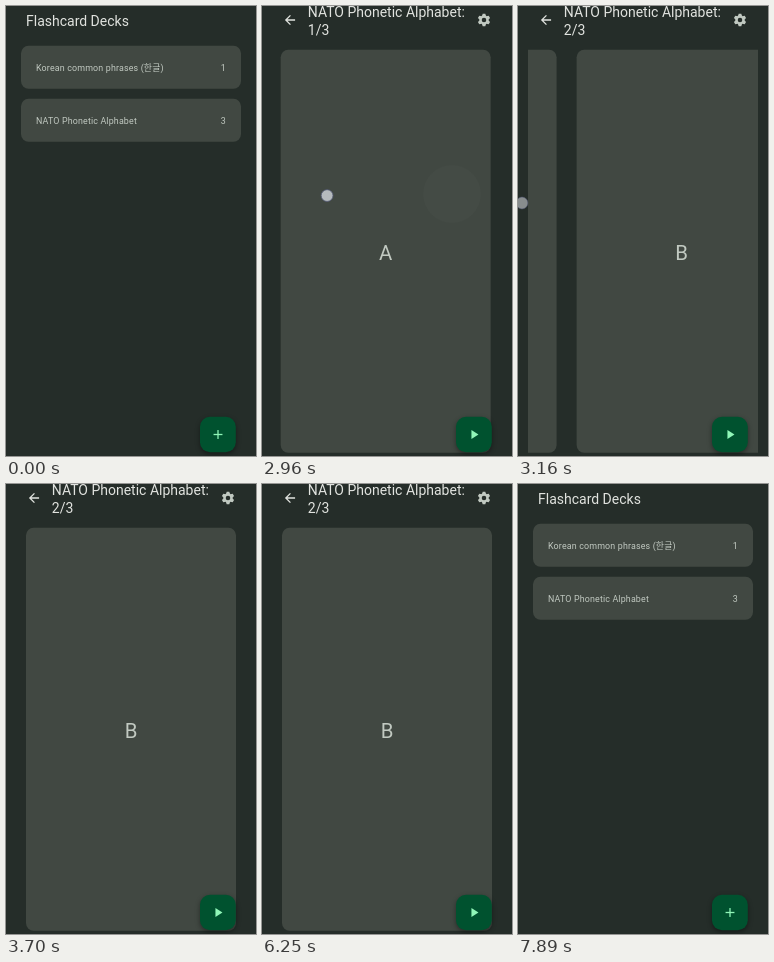
Animation, 250 px wide and 450 px high, one loop 9.7 s. Source, as an HTML page with a canvas:

```html
<!DOCTYPE html>
<html lang="en">
<head>
<meta charset="utf-8">
<title>Flashcards</title>
<style>
  html, body { margin: 0; width: 100%; height: 100%; overflow: hidden; background: #252d29; }
  canvas { display: block; width: 250px; height: 450px; }
</style>
</head>
<body>
<canvas id="stage"></canvas>
<script>
const W = 250, H = 450, LOOP = 9700;
const BG = '#252d29', CARD = '#414842', TITLE = '#e1e3df', BODY = '#c1c9c1';
const FAB = '#00522f', FAB_ICON = '#90f6b8';
const FONT = 'Roboto, "Noto Sans CJK KR", "Noto Sans CJK", sans-serif';
const PAGE = 230;

const scale = window.devicePixelRatio || 1;
const stage = document.getElementById('stage');
const layer = document.createElement('canvas');
for (const canvas of [stage, layer]) {
  canvas.width = W * scale;
  canvas.height = H * scale;
}
const out = stage.getContext('2d');
const ctx = layer.getContext('2d');
out.scale(scale, scale);
ctx.scale(scale, scale);

const clamp = v => Math.max(0, Math.min(1, v));
const progress = (t, start, length) => clamp((t - start) / length);

// Material "fast out, slow in": cubic-bezier(.4, 0, .2, 1)
function fastOutSlowIn(x) {
  let lo = 0, hi = 1;
  for (let i = 0; i < 24; i++) {
    const s = (lo + hi) / 2, r = 1 - s;
    if (1.2 * r * r * s + 0.6 * r * s * s + s * s * s < x) lo = s; else hi = s;
  }
  return lo * lo * (3 - 2 * lo);
}

const fade = (t, start, length) => fastOutSlowIn(progress(t, start, length));

function interpolate(points, t) {
  const i = points.findIndex(p => p[0] > t);
  if (i < 0) return points[points.length - 1].slice(1);
  if (i === 0) return points[0].slice(1);
  const a = points[i - 1], b = points[i];
  const k = (t - a[0]) / (b[0] - a[0]);
  return [a[1] + (b[1] - a[1]) * k, a[2] + (b[2] - a[2]) * k];
}

function text(str, x, y, size, color, align = 'left', spacing = 0) {
  ctx.font = `${size}px ${FONT}`;
  ctx.letterSpacing = `${spacing}px`;
  ctx.textAlign = align;
  ctx.fillStyle = color;
  ctx.fillText(str, x, y);
}

function box(x, y, w, h, r, color) {
  ctx.fillStyle = color;
  ctx.beginPath();
  ctx.roundRect(x, y, w, h, r);
  ctx.fill();
}

function polygon(color, ...points) {
  ctx.fillStyle = color;
  ctx.beginPath();
  for (const [x, y] of points) ctx.lineTo(x, y);
  ctx.fill();
}

// Runs draw() in the 24-unit icon grid, centred on (x, y)
function icon(x, y, draw) {
  ctx.save();
  ctx.translate(x, y);
  ctx.scale(0.636, 0.636);
  draw();
  ctx.restore();
}

function plus() {
  ctx.fillStyle = FAB_ICON;
  ctx.fillRect(-7, -1, 14, 2);
  ctx.fillRect(-1, -7, 2, 14);
}

function play() {
  polygon(FAB_ICON, [-4, -7], [7, 0], [-4, 7]);
}

function backArrow() {
  ctx.strokeStyle = TITLE;
  ctx.lineWidth = 2;
  ctx.beginPath();
  ctx.moveTo(8, 0);
  ctx.lineTo(-6.5, 0);
  ctx.moveTo(0.7, -7.3);
  ctx.lineTo(-6.6, 0);
  ctx.lineTo(0.7, 7.3);
  ctx.stroke();
}

function gear() {
  for (let i = 0; i < 6; i++) {
    polygon(BODY, [-3.2, -6], [-2.1, -9.8], [2.1, -9.8], [3.2, -6]);
    ctx.rotate(Math.PI / 3);
  }
  ctx.strokeStyle = BODY;
  ctx.lineWidth = 3.8;
  ctx.beginPath();
  ctx.arc(0, 0, 5.5, 0, 7);
  ctx.stroke();
}

function fab(symbol) {
  ctx.save();
  ctx.shadowColor = 'rgba(0,0,0,.4)';
  ctx.shadowBlur = 5 * scale;
  ctx.shadowOffsetY = 2 * scale;
  box(194, 410.7, 35.8, 35.6, 10, FAB);
  ctx.restore();
  icon(212, 428.5, symbol);
}

function clear() {
  ctx.fillStyle = BG;
  ctx.fillRect(0, 0, W, H);
}

function deckList() {
  clear();
  text('Flashcard Decks', 20, 19.6, 14, TITLE);
  const decks = [['Korean common phrases (한글)', 1], ['NATO Phonetic Alphabet', 3]];
  decks.forEach(([name, count], i) => {
    const y = 39.7 + i * 53;
    box(15, y, 220, 43, 7.6, CARD);
    text(name, 30, y + 25, 8.9, BODY, 'left', 0.16);
    text(count, 220, y + 25, 8.9, BODY, 'right', 0.16);
  });
  fab(plus);
}

function face(str, x, alpha) {
  ctx.globalAlpha = alpha;
  text(str, x, 253.5, 20.36, BODY, 'center');
  ctx.globalAlpha = 1;
}

function study(t) {
  const slide = 1 - Math.pow(1 - progress(t, 2960, 330), 1.9);
  const flipped = fade(t, 4190, 300) - fade(t, 5590, 300);

  clear();
  text('NATO Phonetic Alphabet:', 45.8, 10.7, 14, TITLE);
  text(slide > 0.5 ? '2/3' : '1/3', 45.8, 28.5, 14, TITLE);
  icon(28, 14, backArrow);
  icon(222, 14, gear);

  ctx.save();
  ctx.beginPath();
  ctx.rect(10, 34, PAGE, H - 34);
  ctx.clip();
  for (let page = 0; page < 2; page++) {
    const x = 20 + PAGE * (page - slide);
    box(x, 43.7, 210, 403, 7.6, CARD);
    if (page === 0) {
      face('A', x + 105, 1);
    } else {
      face('B', x + 105, 1 - flipped);
      face('Bravo', x + 105, flipped);
    }
  }
  if (t >= 2920 && t < 3000) {
    ctx.fillStyle = 'rgba(255,255,255,.015)';
    ctx.beginPath();
    ctx.arc(190, 188, 29, 0, 7);
    ctx.fill();
  }
  ctx.restore();
  fab(play);
}

function show(draw, alpha, t) {
  if (alpha <= 0) return;
  draw(t);
  out.globalAlpha = alpha;
  out.drawImage(layer, 0, 0, W, H);
  out.globalAlpha = 1;
}

const TAPS = [
  [1320, 1560, 153, 117.5],
  [3950, 4190, 144, 235],
  [5420, 5590, 151, 209.5],
  [6820, 7190, 30, 17]
];
const SWIPE = [
  [2710, 198, 181.5], [2900, 198, 181.5], [2960, 66, 189.5],
  [3000, 30, 192], [3050, 12, 195], [3160, 4, 197]
];

function touch(x, y, alpha) {
  out.globalAlpha = alpha;
  out.fillStyle = '#b9bec1';
  out.strokeStyle = '#555b78';
  out.lineWidth = 0.8;
  out.beginPath();
  out.arc(x, y, 5.9, 0, 7);
  out.fill();
  out.stroke();
  out.globalAlpha = 1;
}

function render(t) {
  out.fillStyle = BG;
  out.fillRect(0, 0, W, H);

  if (t < 1770 || t >= 7930) {
    show(deckList, 1);
  } else if (t < 7400) {
    const a = fade(t, 1600, 700);
    if (a < 1) show(deckList, 1 - a);
    show(study, a, t);
  } else {
    const a = fade(t, 7220, 700);
    show(study, 1 - a, t);
    show(deckList, a);
  }

  for (const [start, end, x, y] of TAPS) {
    if (t >= start && t < end) touch(x, y, 0.95);
  }
  if (t >= 2710 && t < 3200) {
    touch(...interpolate(SWIPE, t), 0.97 - 0.3 * progress(t, 3040, 120));
  }
}

const begin = performance.now();
function tick() {
  render((performance.now() - begin) % LOOP);
  requestAnimationFrame(tick);
}
tick();
</script>
</body>
</html>
```
